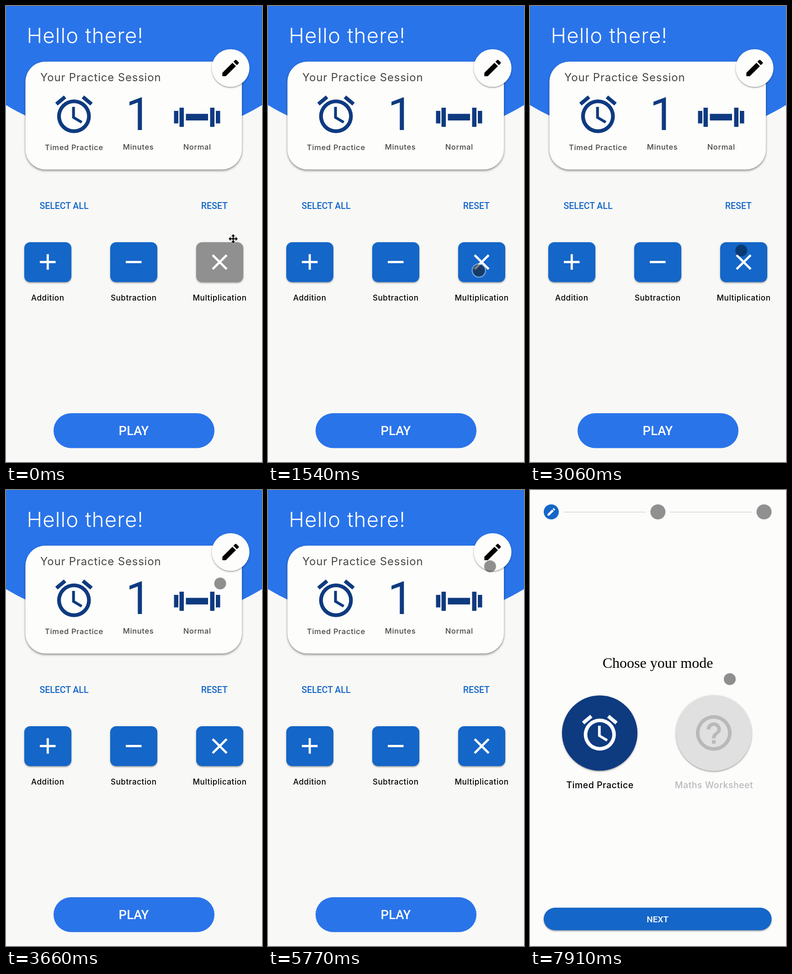
An HTML page for the animation above (8000 ms loop, 560 by 1000 pixels).

```html
<!DOCTYPE html>
<html lang="en">
<head>
<meta charset="utf-8">
<title>Practice session</title>
<style>
  html, body { margin: 0; width: 100%; height: 100%; overflow: hidden; background: #f8f8f6; }
  svg { display: block; width: 100vw; height: 100vh; }
  text { font-family: Inter, "Open Sans", sans-serif; font-weight: 450; letter-spacing: .6px; }
  .mid { text-anchor: middle; }
  .btn { font-family: Roboto, Arial, sans-serif; font-weight: 500; letter-spacing: 0; font-size: 19px; }
  .link { font-size: 19.5px; }
  .label { font-size: 16.5px; letter-spacing: .65px; fill: #454545; }
  .op { font-size: 17px; }
  .mode { font-size: 19.5px; letter-spacing: .5px; }
  .lift { filter: drop-shadow(0 2px 1px rgba(0, 0, 0, .24)) drop-shadow(0 1px 2px rgba(0, 0, 0, .16)); }
  .card { filter: drop-shadow(0 3px 2px rgba(0, 0, 0, .3)) drop-shadow(0 1px 2px rgba(0, 0, 0, .18)); }
  .navy { fill: #0e3a80; }
  .blue { fill: #1466c8; }
  .paper { fill: #fdfdfb; }
  .sign { stroke: #fff; stroke-width: 4.9; fill: none; }

  .home, .setup, .tile, .arrows, .dot, .rest, .press { animation: 8s linear infinite; }
  .home { animation-name: home; animation-timing-function: step-end; }
  .setup { animation-name: setup; animation-timing-function: step-end; }
  .tile { animation-name: tile; }
  .arrows { animation-name: arrows; animation-timing-function: step-end; }
  .dot { animation-name: move; }
  .rest { animation-name: rest; animation-timing-function: step-end; }
  .press { animation-name: press; animation-timing-function: step-end; }

  @keyframes home { 0% { visibility: visible } 72.375%, 100% { visibility: hidden } }
  @keyframes setup { 0% { visibility: hidden } 72.375%, 100% { visibility: visible } }
  @keyframes arrows { 0% { opacity: 1 } 5%, 100% { opacity: 0 } }
  @keyframes tile {
    0%, 16.99% { fill: #909090 }
    17%, 24% { fill: #1466c8 }
    28%, 32% { fill: #4283d6 }
    35%, 100% { fill: #1466c8 }
  }
  @keyframes move {
    0%, 5% { transform: translate(492px, 518px); animation-timing-function: ease-in-out }
    12%, 36% { transform: translate(461.3px, 580px); animation-timing-function: ease-in-out }
    45.5%, 47% { transform: translate(468.5px, 205px); animation-timing-function: ease-in-out }
    54%, 87% { transform: translate(485.8px, 167.3px); animation-timing-function: ease-in-out }
    98.8%, 100% { transform: translate(437px, 414.7px) }
  }
  @keyframes rest {
    0% { opacity: 0 } 5% { opacity: 1 } 16% { opacity: 0 } 33% { opacity: 1 }
    66% { opacity: 0 } 69% { opacity: 1 } 100% { opacity: 1 }
  }
  @keyframes press {
    0% { opacity: 0 } 16% { opacity: 1 } 33% { opacity: 0 }
    66% { opacity: 1 } 69% { opacity: 0 } 100% { opacity: 0 }
  }
</style>
</head>
<body>
<svg viewBox="0 0 560 1000" preserveAspectRatio="none">
  <defs>
    <path id="alarm" d="M22 5.72l-4.6-3.86-1.29 1.53 4.6 3.86L22 5.72zM7.88 3.39L6.6 1.86 2 5.71l1.29 1.53 4.59-3.85zM12.5 8H11v6l4.75 2.85.75-1.23-4-2.37V8zM12 4a9 9 0 0 0 0 18a9 9 0 0 0 0-18zm0 16a7 7 0 1 1 0-14a7 7 0 0 1 0 14z"/>
    <path id="pencil" d="M3 17.25V21h3.75L17.81 9.94l-3.75-3.75L3 17.25zM20.71 7.04a1 1 0 0 0 0-1.41l-2.34-2.34a1 1 0 0 0-1.41 0l-1.83 1.83 3.75 3.75 1.83-1.83z"/>
    <path id="help" d="M11 18h2v-2h-2v2zm1-16C6.48 2 2 6.48 2 12s4.48 10 10 10 10-4.48 10-10S17.52 2 12 2zm0 18c-4.41 0-8-3.59-8-8s3.59-8 8-8 8 3.59 8 8-3.59 8-8 8zm0-14c-2.21 0-4 1.79-4 4h2c0-1.1.9-2 2-2s2 .9 2 2c0 2-3 1.75-3 5h2c0-2.25 3-2.5 3-5 0-2.21-1.79-4-4-4z"/>
    <rect id="tile" width="103" height="87.5" rx="13"/>
  </defs>

  <g class="home">
    <rect width="560" height="1000" fill="#f8f8f6"/>
    <circle cx="280" cy="-244.5" r="540" fill="#2a74ea"/>
    <text x="45.5" y="81" fill="#fff" style="font-size:45.5px;font-weight:300;letter-spacing:1.1px">Hello there!</text>

    <rect class="paper card" x="42.5" y="122" width="473.5" height="236.5" rx="44"/>
    <text x="75" y="165" fill="#454545" style="font-size:24px;font-weight:400;letter-spacing:.8px">Your Practice Session</text>
    <g class="navy">
      <use href="#alarm" transform="translate(99.5 188.5) scale(4.1)"/>
      <text x="261.7" y="272" style="font:400 100px Roboto,Arial,sans-serif;letter-spacing:0">1</text>
      <path d="M367.5 230h9.5v27.5h-9.5zM379.5 223h9.5v42h-9.5zM393.5 236.5h48.500v14.500h-48.500zM446.500 223h9.500v42h-9.500zM459 230h9.500v27.500h-9.500z"/>
    </g>
    <g class="mid">
      <text class="label" x="149" y="316">Timed Practice</text>
      <text class="label" x="289.5" y="315">Minutes</text>
      <text class="label" x="418.3" y="315">Normal</text>
    </g>
    <circle class="paper lift" cx="491.3" cy="136" r="41.3"/>
    <use href="#pencil" transform="translate(467.3 112) scale(2)"/>

    <text class="btn link blue" x="73.4" y="445">SELECT ALL</text>
    <text class="btn link blue" x="426.8" y="445">RESET</text>

    <g class="lift blue">
      <use href="#tile" x="40" y="518"/>
      <use href="#tile" x="228" y="518"/>
      <use href="#tile" class="tile" x="416" y="518"/>
    </g>
    <path class="sign" d="M74 561.5h34.5M91.3 544.3v34M262 561.5h34.5M452 546.2l30.8 30.8M482.8 546.2l-30.8 30.8"/>
    <g class="mid">
      <text class="op" x="91.2" y="646">Addition</text>
      <text class="op" x="279.2" y="646">Subtraction</text>
      <text class="op" x="467.5" y="646">Multiplication</text>
    </g>

    <rect x="104" y="893" width="352" height="76.5" rx="38.25" fill="#2a74ea"/>
    <text class="btn mid" x="279.5" y="941" fill="#fff" style="font-size:27.5px">PLAY</text>

    <path class="arrows" transform="translate(497 510.5)" d="M0-10l4.5 4.5H1.2V-1.2H5.5V-4.5L10 0 5.5 4.5V1.2H1.2V5.5H4.5L0 10-4.5 5.5H-1.2V1.2H-5.5V4.5L-10 0-5.5-4.5V-1.2H-1.2V-5.5H-4.5z" stroke="#fff" stroke-width="1.5" paint-order="stroke"/>
  </g>

  <g class="setup">
    <rect width="560" height="1000" fill="#fcfcfb"/>
    <path d="M74 48.5h178.5M307 48.5h178" stroke="#d4d4d4" stroke-width="1.4"/>
    <circle class="blue" cx="46.5" cy="48" r="16.5"/>
    <use href="#pencil" fill="#fff" transform="translate(35.6 37) scale(.92)"/>
    <circle cx="279.8" cy="48" r="16.5" fill="#909090"/>
    <circle cx="512" cy="48" r="16.5" fill="#909090"/>

    <text class="mid" x="279.5" y="390" style="font:400 32px 'Liberation Serif',Times,serif;letter-spacing:0">Choose your mode</text>

    <circle class="navy lift" cx="152.5" cy="533" r="82.5"/>
    <use href="#alarm" fill="#fff" transform="translate(105.9 485.7) scale(3.9)"/>
    <circle class="lift" cx="402" cy="533" r="83" fill="#dfe0df"/>
    <use href="#help" fill="#b8b9b8" transform="translate(355.2 486) scale(3.9)"/>
    <text class="mode mid" x="153" y="654">Timed Practice</text>
    <text class="mode mid" x="402.5" y="654" fill="#b9b9bc">Maths Worksheet</text>

    <rect class="blue lift" x="30" y="916" width="498.5" height="49.5" rx="24.75"/>
    <text class="btn mid" x="279.2" y="948" fill="#fff">NEXT</text>
  </g>

  <g class="dot">
    <circle class="rest" r="13" fill="#000" fill-opacity=".435"/>
    <g class="press">
      <circle r="13.5" fill="#191919" fill-opacity=".56"/>
      <circle r="14.6" fill="none" stroke="#fff" stroke-opacity=".42" stroke-width="2.4"/>
    </g>
  </g>
</svg>
</body>
</html>
```
